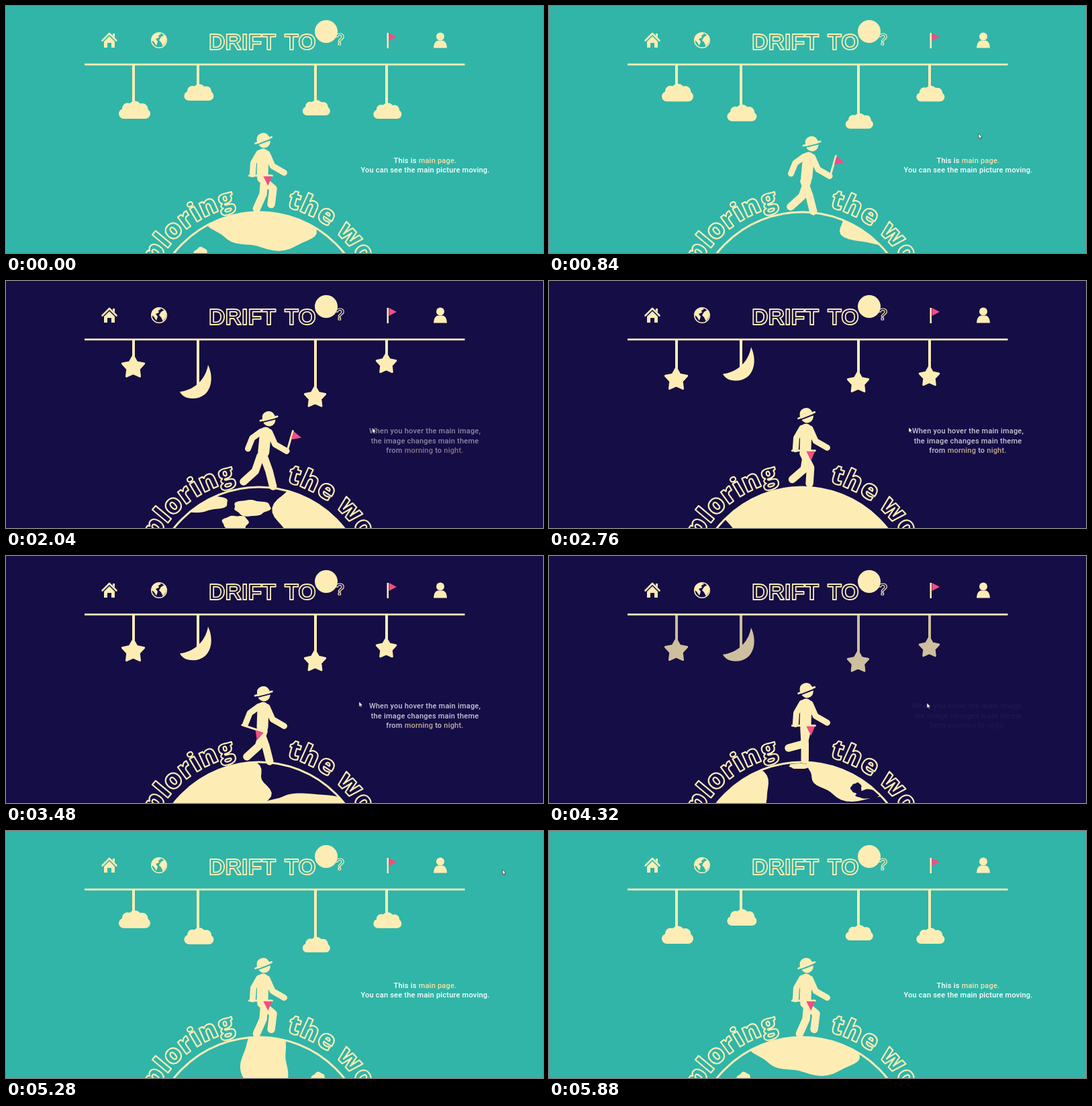
An HTML page for the animation above (6000 ms loop, 800x368 px).

```html
<!DOCTYPE html>
<html lang="en">
<head>
<meta charset="utf-8">
<title>Drift to</title>
<style>
html, body { margin: 0; width: 100%; height: 100%; overflow: hidden; }
svg { display: block; width: 100vw; height: 100vh; --bg: #30b5a8; --cream: #fdedb5; --pink: #ee4f83; background: var(--bg); }
.fill { fill: var(--cream); }
.line { fill: none; stroke: var(--cream); stroke-linecap: round; stroke-linejoin: round; }
.pink { fill: var(--pink); }
.bg { fill: var(--bg); }
.cut { fill: none; stroke: var(--bg); }
.title { font: bold 34px "Liberation Sans", Arial, sans-serif; stroke-width: 1.8; }
.arc { font: 800 40px "Open Sans", sans-serif; stroke-width: 2.2; letter-spacing: .5px; }
.say { font: 500 11px Roboto, sans-serif; letter-spacing: .22px; text-anchor: middle; fill: #fff; }
.say tspan { fill: #f9e2a6; }
</style>
</head>
<body>
<svg viewBox="0 0 800 368" preserveAspectRatio="none">
  <defs>
    <clipPath id="disc"><circle cx="377" cy="469" r="162"/></clipPath>
    <path id="rim" d="M203 469A174 174 0 0 1 551 469"/>
  </defs>

  <g id="menu">
    <path class="line" d="M143.500 51.500 154 41 164.500 51.500" stroke-width="2.600"/>
    <path class="fill" d="M146 53 154 45 162 53V62H157V55H151V62H146ZM159 41H162V47L159 44Z"/>
    <circle class="line" cx="228" cy="51" r="11.300" stroke-width="1.500"/>
    <path class="fill" d="M218 45Q222 40 228 40L231 42 227 44 228 47 223 49 226 53 224 59 220 53 217 51ZM231 46 236 43 239 48 238 54 234 60 231 54 228 51Z"/>
    <path class="fill" d="M567.500 40H570V63H567.500Z"/>
    <path class="pink" d="M570.500 40 582 46 570.500 52Z"/>
    <circle class="fill" cx="647" cy="45.500" r="6"/>
    <path class="fill" d="M637 62.500Q637.500 53 643 51.500H651Q656.500 53 657 62.500Z"/>
    <text class="line title" x="302" y="65">DRIFT</text>
    <text class="line title" x="415" y="65">TO</text>
    <circle class="fill" cx="477" cy="38" r="17"/>
    <text class="line title" x="490" y="58" style="font-size:24px;stroke-width:1.200">?</text>
  </g>

  <g id="clouds"></g>
  <g id="stars"></g>
  <path class="fill" d="M117 85.800H683.500V88.400H117Z"/>

  <g clip-path="url(#disc)"><path id="land" class="fill"/><path id="lakes" class="bg"/></g>
  <circle class="line" cx="377" cy="469" r="162" stroke-width="3"/>
  <text class="line arc" text-anchor="end"><textPath href="#rim" startOffset="239">exploring</textPath></text>
  <text class="line arc"><textPath href="#rim" startOffset="314">the world</textPath></text>

  <g id="walker">
    <path id="legs" class="line" stroke-width="11.500"/>
    <path id="torso" class="line" stroke-width="17"/>
    <path id="arms" class="line" stroke-width="9"/>
    <g id="flag">
      <path class="line" d="M0 0H34" stroke-width="3"/>
      <path class="pink" d="M34 1H21L28 15Z"/>
    </g>
    <g id="head">
      <circle class="fill" r="9.500" cy="1"/>
      <path class="cut" d="M-13 1.800H13" stroke-width="2"/>
      <path class="fill" d="M-10-1Q-9-12 0-12 9-12 10-1Z"/>
      <path class="line" d="M-13-1H13" stroke-width="2.800"/>
    </g>
  </g>

  <g id="dayText" class="say">
    <text x="624.500" y="233.500">This is <tspan>main page.</tspan></text>
    <text x="624.500" y="248">You can see the main picture moving.</text>
  </g>
  <g id="nightText" class="say">
    <text x="624" y="227">When you hover the main image,</text>
    <text x="624" y="241.500">the image changes main theme</text>
    <text x="624" y="256">from <tspan>morning</tspan> to <tspan>night.</tspan></text>
  </g>
  <path id="cursor" d="M0 0V7.500L1.800 6 3 8.500 4.200 8 3 5.500H5.300Z" fill="#fff" stroke="#222" stroke-width=".6"/>
</svg>
<script>
const LOOP = 6000, STEP = 120, STRIDE = 585, BOB = 1960, FACE = 280;
const $ = id => document.getElementById(id);
const set = (id, attrs) => { for (const k in attrs) $(id).setAttribute(k, attrs[k]); };
const mix = (a, b, k) => a + (b - a) * k;
const ramp = (t, a, b) => Math.max(0, Math.min(1, (t - a) / (b - a)));

// CSS "ease" curve
function ease(x) {
  let lo = 0, hi = 1, s = .5;
  for (let i = 0; i < 20; i++) {
    s = (lo + hi) / 2;
    const bx = .75 * s * (1 - s) ** 2 + .75 * s * s * (1 - s) + s ** 3;
    if (bx < x) lo = s; else hi = s;
  }
  return .3 * s * (1 - s) ** 2 + 3 * s * s * (1 - s) + s ** 3;
}

// keys are [time, ...values]
function track(keys, t) {
  let i = 0;
  while (i < keys.length - 2 && keys[i + 1][0] <= t) i++;
  const [a, b] = [keys[i], keys[i + 1]], k = ramp(t, a[0], b[0]);
  return a.slice(1).map((v, j) => mix(v, b[j + 1], k));
}

// closed outline from radius r(angle), with n corners
function outline(n, x, y, r) {
  let d = "";
  for (let i = 0; i < n; i++) {
    const a = i / n * 2 * Math.PI, [rx, ry] = r(a, i);
    d += (i ? "L" : "M") + (x + rx * Math.sin(a)).toFixed(1) + " " + (y - ry * Math.cos(a)).toFixed(1);
  }
  return d + "Z";
}

// hanging things: string x, size, y at both ends of the bob
const CLOUDS = [[190, 47, 168, 142], [286, 44, 141, 172], [461, 41, 163, 183], [567, 42, 168, 142]];
const STARS = [[190, 17, 127, 147], [286, 0, 177, 148], [461, 16, 175, 151], [567, 15, 122, 143]];

const cloud = w => `<g transform="scale(${w / 47})" class="fill"><rect x="-22" y="-15" width="47" height="15" rx="7.500"/>
  <circle cx="2" cy="-16.500" r="10"/><circle cx="-9" cy="-15.500" r="8"/><circle cx="13" cy="-14.500" r="8.500"/></g>`;
const star = r => `<path class="fill line" style="fill:var(--cream)" stroke-width="3" d="${
  outline(10, -.5, 0, (a, i) => Array(2).fill(i % 2 ? r * .54 : r))}"/>`;
const moon = '<path class="fill" d="M15-50C25-30 20 0-8 0-18 0-24-4-27-10-8-12 11-26 15-50Z"/>';

function hang(id, items, draw) {
  $(id).innerHTML = items.map(([x, size]) =>
    `<g><path class="line" stroke-width="4" style="stroke-linecap:butt"/><g>${draw(size)}</g></g>`).join("");
}
hang("clouds", CLOUDS, cloud);
hang("stars", STARS, r => r ? star(r) : moon);

function bob(id, items, gap, k) {
  items.forEach(([x, size, y0, y1], i) => {
    const [line, thing] = $(id).children[i].children, y = mix(y0, y1, k);
    line.setAttribute("d", `M${x} 87V${y - gap}`);
    thing.setAttribute("transform", `translate(${x} ${y})`);
  });
}

// lands on the turning globe: face, x, y, half width, half height
const LANDS = [[0, 388, 322, 80, 40], [0, 290, 372, 12, 12], [1, 430, 318, 82, 40],
  [2, 282, 330, 46, 15], [2, 366, 338, 27, 12], [2, 342, 361, 19, 12], [2, 475, 345, 70, 60],
  [3, 300, 342, 95, 50], [3, 450, 372, 70, 17],
  [4, 270, 345, 54, 55], [4, 375, 313, 18, 4], [4, 460, 322, 74, 40],
  [5, 320, 366, 24, 42], [5, 492, 345, 34, 60]];
const LAKES = [[4, 458, 346, 8, 8], [4, 475, 355, 17, 7]];
// when each face is in front
const PASS = [0, 1200, 2040, 3480, 4320, 4920, 5880, LOOP].map((t, i) => [t, Math.min(i, 6)]);

// ellipse with a wavy coast
const blob = (x, y, w, h, seed) => outline(60, x, y, a => {
  const q = 1 + .08 * Math.sin(3 * a + seed) + .05 * Math.sin(7 * a + 2 * seed);
  return [w * q, h * q];
});
function spin(t) {
  const turn = track(PASS, t)[0];
  const paint = list => list.map(([face, x, y, w, h], i) => {
    const off = (face - turn + 9) % 6 - 3;
    return blob(x + off * FACE, y, w, h, i);
  }).join("");
  set("land", { d: paint(LANDS) });
  set("lakes", { d: paint(LAKES) });
}

// one leg over a stride: phase, thigh and shin angles; the other leg is half a stride behind
const LEG = [[0, 20, 14], [.04, 20, 14], [.051, -5, -24], [.105, -5, -24], [.436, -13, -75], [.46, -19, -48],
  [.54, -19, -48], [.551, 50, -7], [.605, 50, -7], [.936, 3, 0], [.96, 20, 14], [1, 20, 14]];

function limb(x, y, angles, length) {
  let d = `M${x} ${y}`;
  for (const a of angles) {
    x += length * Math.sin(a * Math.PI / 180);
    y += length * Math.cos(a * Math.PI / 180);
    d += `L${x.toFixed(1)} ${y.toFixed(1)}`;
  }
  return { d, x, y };
}
function walk(t) {
  const s = (t / STRIDE + .051) % 1, half = Math.abs(s - .5);
  const wide = ramp(Math.min(half, .5 - half), .051, .04);
  const ahead = half < .045, lean = ahead ? 6 * wide : 0;
  const x = 383 + lean * .6, y = 221 + 5 * wide;
  const rear = limb(x - 6, y - 2, [mix(-30, -54, wide), mix(-4, -22, wide)], 17);
  const front = limb(x + 6, y - 1, [24, 60], 20);
  const legs = [0, .5].map(o => limb(382 + (o ? -2 : 3) * (s < .5 ? 1 : -1), 257 + 4 * wide, track(LEG, (s + o) % 1), 23.5).d);
  set("legs", { d: legs.join("") });
  set("arms", { d: rear.d + front.d });
  set("torso", { d: `M${x} ${y}L${382 + lean * .3} ${251 + 4 * wide}` });
  set("head", { transform: `translate(${384 + lean * 1.3} ${201 + 5 * wide}) rotate(${-21 + 7 * wide})` });
  set("flag", { transform: ahead ? `translate(${front.x} ${front.y + 3}) rotate(-74)`
    : `translate(${rear.x - 5} ${rear.y + 2}) rotate(${18 * wide})` });
}

const POINTER = [[240, 779, 27], [840, 640, 190], [1200, 593, 217], [2040, 546, 219],
  [3480, 526, 217], [4320, 563, 219], [4920, 624, 212], [5400, 778, 6]];
const DAY = [48, 181, 168], NIGHT = [21, 13, 70];

function draw(t) {
  const night = t < LOOP / 2 ? ease(ramp(t, 900, 1400)) : 1 - ramp(t, 4500, 5080);
  const rgb = DAY.map((v, i) => Math.round(mix(v, NIGHT[i], night)));
  document.querySelector("svg").style.setProperty("--bg", `rgb(${rgb})`);
  const turn = t % BOB / BOB * 2, k = ease(Math.min(turn, 2 - turn));
  bob("clouds", CLOUDS, 16, k);
  bob("stars", STARS, 12, k);
  const day = 1 - ramp(t, 840, 1205) + ramp(t, 4560, 5160);
  set("clouds", { opacity: day });
  set("dayText", { opacity: day });
  set("stars", { opacity: ramp(t, 1260, 1860) - ramp(t, 4260, 4560) });
  set("nightText", { opacity: .76 * (ramp(t, 1680, 2220) - ramp(t, 3900, 4345)) });
  const [x, y] = track(POINTER, t);
  set("cursor", { transform: `translate(${x} ${y})`, opacity: t >= 240 && t <= 5400 ? 1 : 0 });
  spin(t);
  walk(t);
}

const start = performance.now();
function tick() {
  const t = (performance.now() - start) % LOOP;
  draw(Math.floor(t / STEP) * STEP);
  requestAnimationFrame(tick);
}
tick();
</script>
</body>
</html>
```
